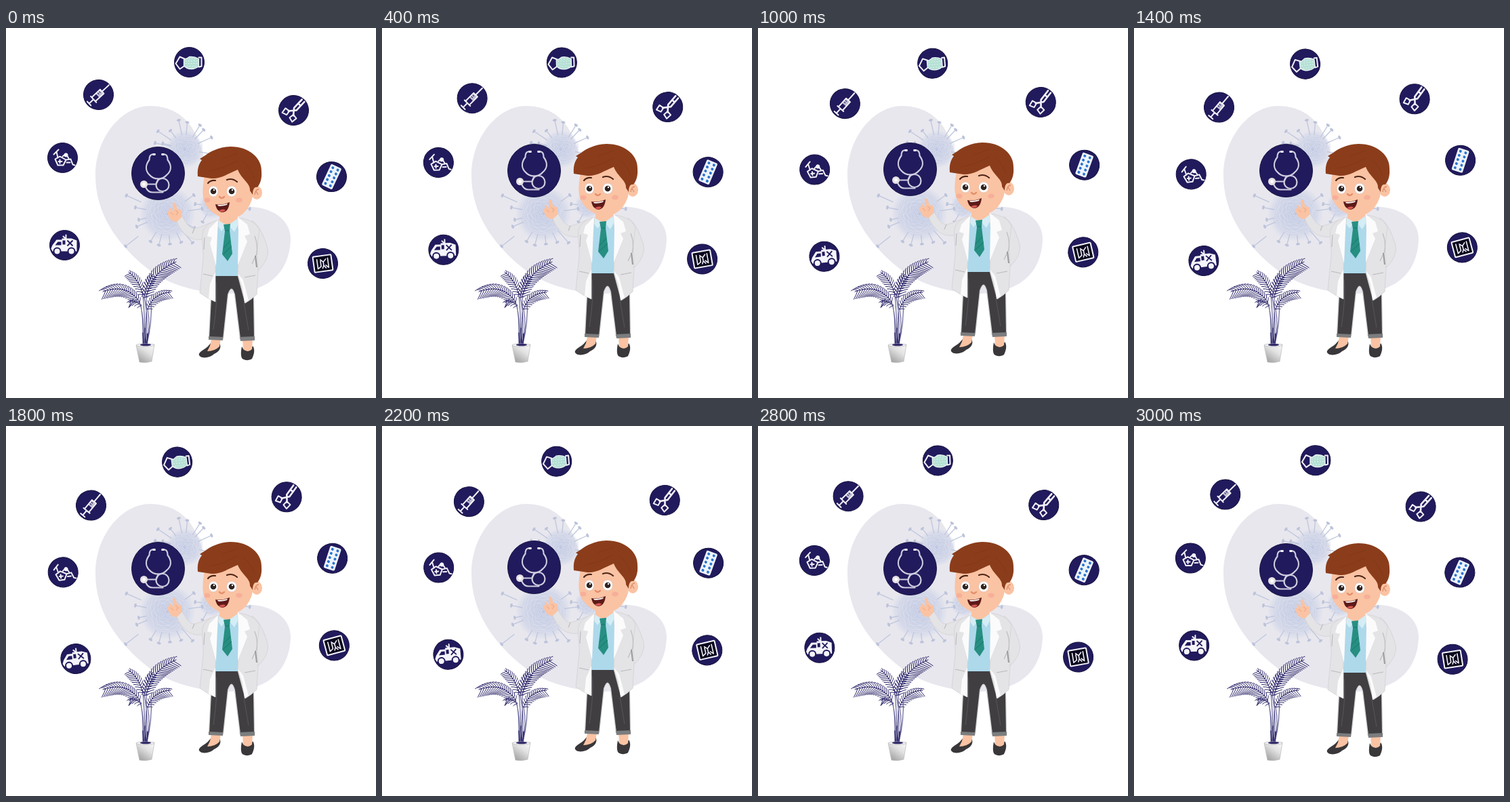
An HTML page that plays this animation: 546 by 546 pixels, repeating every 3.2 s.

```html
<!DOCTYPE html>
<html lang="en">
<head>
<meta charset="utf-8">
<title>Doctor with medical icons</title>
<style>
  html, body { margin: 0; width: 100%; height: 100%; overflow: hidden; background: #fff; }
  svg { display: block; width: 100%; height: 100%; }
  .line { fill: none; stroke: #f2f1f8; stroke-width: 2; stroke-linecap: round; stroke-linejoin: round; }
  .disc { fill: #211a5c; stroke: #151040; stroke-width: 1; }
  .white { fill: #f4f4fa; }
  .skin { fill: #fac3a3; }
  .coat { fill: #e4e3e5; stroke: #d2d1d4; stroke-width: .8; }
  .lapel { fill: #fbfbfc; }
</style>
</head>
<body>
<svg viewBox="0 0 546 546">
  <defs>
    <linearGradient id="potShade" x1="1" y1="0" x2=".3" y2="1">
      <stop offset="0" stop-color="#fafafa"/>
      <stop offset=".45" stop-color="#e2e2e2"/>
      <stop offset="1" stop-color="#a4a4a6"/>
    </linearGradient>
    <radialGradient id="haze">
      <stop offset="0" stop-color="#b2bdde" stop-opacity=".75"/>
      <stop offset=".75" stop-color="#bdc6e1" stop-opacity=".5"/>
      <stop offset="1" stop-color="#c9cfe5" stop-opacity="0"/>
    </radialGradient>
  </defs>

  <path fill="#e8e7ee" d="M212 115C240 115 261 127 273 145C286 164 292 185 296 210C302 245 326 263 364 264C398 267 420 286 420 311C419 355 393 392 322 392C272 389 234 376 205 352C160 315 132 270 132 218C132 160 172 115 212 115Z"/>
  <g id="viruses"></g>
  <g id="plant"></g>

  <g id="ring">
    <g transform="translate(270.5 50.5)">
      <circle class="disc" r="22"/>
      <path class="line" d="M-7-5L-14-8L-20 2L-14 10L-8 6M14-7L18-7L18 6L14 7"/>
      <path fill="#b5e0d5" stroke="#eef8f6" stroke-width="1.3" d="M-8-4Q-3-5 0-8Q7-9 14-5V6Q9 10 3 10Q-4 10-8 5Z"/>
      <path fill="none" stroke="#e3f5ef" stroke-dasharray="2 2" d="M-6-2H12M-6 2H12M-4 6H10M-1-5H9"/>
    </g>
    <g transform="translate(136.5 98.5) rotate(-43)">
      <circle class="disc" r="22"/>
      <path class="line" d="M-19-4V4M-19 0H-10M-10-6V6M-9-4H7V4H-9M7 0H12"/>
      <path class="line" d="M13 0H21" stroke-width="3"/>
      <path class="white" d="M-2-4H7V4H-2Z" opacity=".75"/>
      <path stroke="#211a5c" d="M1-3V0M4-3V0"/>
    </g>
    <g transform="translate(83.5 191.5)">
      <circle class="disc" r="22"/>
      <path class="line" d="M-6-12L-13-5M-9-9L-7 0M-11 2L-4-2L5 3L1 11L-7 11ZM0-2L5-6L9 1M5 3L12 2L15 10L18 11M6 7L11 7"/>
      <path class="line" d="M-4 3V8M-6 5.5H-1" stroke-width="1.6"/>
      <circle class="white" cx="5" cy="-4" r="3"/>
    </g>
    <g transform="translate(86.5 320.5)">
      <circle class="disc" r="22"/>
      <path class="white" d="M-18 0L-12-8L-4-8V-10H10L18-7V9H-18L-20 5Z"/>
      <path class="line" d="M-2-13L1-10M2-15V-10"/>
      <path fill="#211a5c" d="M-14 0L-10-5H-5V0ZM-3-7H1V-1H-3Z"/>
      <path stroke="#211a5c" stroke-width="1.8" d="M4 1L12-7M4-7L12 1"/>
      <g fill="#f4f4fa" stroke="#211a5c" stroke-width="2">
        <circle cx="-11" cy="9" r="5"/><circle cx="10" cy="9" r="5"/>
      </g>
    </g>
    <g transform="translate(424.5 121.5) rotate(43)">
      <circle class="disc" r="22"/>
      <path class="line" d="M-2-20L-2-3L5 6M3-20L3-3L-5 6M-2-12H3" style="stroke-width:2.6"/>
      <path class="line" d="M-11 6L-4 5L-3 12L-10 14ZM11 6L4 5L3 12L10 14Z"/>
    </g>
    <g transform="translate(480.5 219.5) rotate(25)">
      <circle class="disc" r="22"/>
      <rect x="-8.5" y="-17" width="17" height="34" rx="2" fill="#eef4fc"/>
      <g id="pills" fill="#2b74cf"></g>
    </g>
    <g transform="translate(467.5 347.5) rotate(-8)">
      <circle class="disc" r="22"/>
      <rect x="-13.5" y="-11.5" width="27" height="23" rx="1" fill="#07061c" stroke="#f4f4fa" stroke-width="2"/>
      <path class="line" d="M-8-7V7L-3 4V-4M-3-6L1-2L5-6M1-2V2M8-7V7L4 3M-1 7L1 3L4 7" style="stroke-width:1.6"/>
    </g>
  </g>

  <g id="doctor">
    <g transform="translate(224.5 214.5)">
      <circle class="disc" r="39"/>
      <g fill="none" stroke="#cfcde0" stroke-width="2.2" stroke-linecap="round">
        <path d="M-5-28H-9Q-13-27-13-20C-19-12-19-4-13 2Q-8 8 0 8Q8 8 13 2C20-4 20-12 14-20Q14-27 10-28H6"/>
        <path d="M0 8Q-1 13-3 16H-18"/>
        <circle cx="6.5" cy="17" r="9.5"/>
        <path d="M-18 21Q-15 28-8 28H7"/>
      </g>
      <path stroke="#f4f4fa" stroke-width="3" d="M-8-28H-4M5-28H9"/>
      <circle cx="-21" cy="16" r="5.5" fill="#e6e1e4"/>
      <circle cx="-21" cy="16" r="2.4" fill="#fff"/>
    </g>

    <path fill="#39373a" d="M302 465C303 471 308 473 315 465C319 472 314 478 307 481C302 486 292 488 287 485C282 482 286 478 291 475C296 472 299 469 302 465ZM348 470C351 478 361 478 364 469C368 474 366 482 363 488C359 491 351 491 348 487C346 482 347 475 348 470Z"/>
    <path class="skin" d="M303 459H317L315 470Q308 477 297 477L301 469ZM349 459H364L363 474Q357 480 350 474Z"/>
    <path fill="#403e41" stroke="#cfcfd1" stroke-width="2.4" paint-order="stroke" d="M308 364H345L365 398L366 458H346L338 393Q333 376 327 393L320 458H300L303 400Z"/>
    <path fill="#7c7d7f" d="M299 455L320 456V461L299 460ZM345 456L367 455V461L346 462Z"/>
    <path fill="none" stroke="#58565a" d="M310 375Q313 400 306 445M351 405L358 446"/>

    <path class="coat" d="M363 284C374 291 382 310 386 325C388 336 383 347 372 358L358 358L363 342L371 330Z"/>
    <path class="skin" d="M315 275H341V290L327 300L315 291Z"/>
    <path fill="#add9eb" d="M313 285L326 291L342 283L344 310L342 366H308L310 310Z"/>
    <path fill="#d4edf6" d="M314 284L325 291L318 300L311 290ZM342 281L328 291L337 301L344 288Z"/>
    <path fill="#278f82" d="M321 290L331 289L330 299L334 333L327 344L319 334L323 300Z"/>
    <path stroke="#1b7469" fill="none" d="M323 299H330M321 325L331 314M321 333L333 322"/>

    <path class="coat" d="M252 285L260 278C266 288 270 295 277 296C286 295 294 290 303 287L297 310C286 314 273 313 265 305C258 298 254 292 252 285Z"/>
    <path class="coat" d="M314 283C302 286 294 292 291 299C287 310 292 325 291 341L286 391Q297 399 309 404L309 360L311 312Z"/>
    <path class="coat" d="M342 280C356 281 369 287 374 298L370 330L372 357L370 393Q362 401 353 406L342 365L344 315Z"/>
    <path class="lapel" d="M313 283L300 296L297 307L304 309L301 318L310 351L312 302ZM342 279L356 290L360 304L352 307L356 315L342 350L343 300Z"/>
    <path class="lapel" d="M309 360L301 378L299 399L309 404ZM342 362L349 382L352 406L358 402L350 372Z"/>
    <path fill="none" stroke="#bab9bd" stroke-width="1.1" d="M291 363L305 366M352 368L368 365M367 307Q372 320 370 333L363 348M293 309L292 327M278 296L275 303"/>
    <path stroke="#99989c" stroke-width="2" d="M368 336L370 353"/>

    <path class="skin" d="M239 275C236 272 238 269 242 271L240 267C241 264 244 266 247 271L246 260C247 256 250 257 251 261L253 268C257 266 260 269 259 274L260 278L252 286C245 286 241 282 239 275Z"/>
    <path fill="none" stroke="#e9a182" d="M243 272L247 276M250 269L254 272L251 276"/>

    <ellipse class="skin" cx="370" cy="243" rx="8" ry="10"/>
    <path fill="none" stroke="#dc8d6c" stroke-width="1.3" d="M367 246Q368 238 373 238M369 241L372 246"/>
    <path class="skin" d="M293 216C292 226 289 238 291 250C293 264 305 276 325 282C346 282 357 270 363 253L367 226L346 200Z"/>
    <path fill="#8b3d1b" d="M283 219C282 209 284 201 289 195L286 193L294 188C302 182 313 176 331 175C360 175 378 193 377 212C378 222 375 230 371 235C366 234 364 239 364 246L360 240C361 229 348 224 342 209C327 215 317 223 303 222Z"/>
    <path fill="none" stroke="#75300f" stroke-width="1" opacity=".4" d="M300 211Q320 208 341 196M318 193L342 185M350 197Q362 208 367 222"/>
    <g fill="#f59d91" opacity=".5">
      <ellipse cx="297" cy="254" rx="4.5" ry="3.5"/><ellipse cx="344" cy="254" rx="5" ry="3.5"/>
    </g>
    <g fill="#fff" stroke="#ddbba9" stroke-width=".7">
      <ellipse cx="306" cy="241" rx="7" ry="8"/><ellipse cx="333" cy="241" rx="7.5" ry="8"/>
    </g>
    <g fill="#302421"><circle cx="306" cy="241" r="4.3"/><circle cx="333" cy="241" r="4.3"/></g>
    <g fill="#fff"><circle cx="307" cy="239" r="1.2"/><circle cx="334" cy="239" r="1.2"/></g>
    <path fill="none" stroke="#4d2418" stroke-width="2.2" stroke-linecap="round" d="M298 229Q302 224 309 225M326 224Q334 221 341 227"/>
    <path fill="none" stroke="#e48c68" stroke-width="2.4" stroke-linecap="round" d="M315 249Q318 253 322 249"/>
    <path fill="#5d1a18" d="M309 260Q319 262 330 257C329 267 325 272 319 272C313 271 310 266 309 260Z"/>
    <path fill="#fff" d="M312 261Q320 261.5 327 259L326 261Q319 263.5 313 262.5Z"/>
    <path fill="#d95650" d="M314 269.5Q320 266 324 268.5Q322 271.5 318 271.5Z"/>
  </g>
</svg>
<script>
  const byId = id => document.getElementById(id);
  const range = n => Array.from({ length: n }, (_, i) => i);
  const fix = n => n.toFixed(1);
  let seed = 7;
  const random = () => (seed = seed * 16807 % 2147483647) / 2147483647;

  // Hazy core with wavy rings, and spikes at [degrees, length]
  function virus(x, y, r, spikes) {
    const rings = range(Math.round(r / 3)).map(i => {
      const base = 3 + i * 3, phase = random() * 6;
      const points = range(40).map(k => {
        const a = k * Math.PI / 20;
        const d = base + Math.sin(a * 7 + phase) * 1.2 + random() * 1.3;
        return `${fix(x + d * Math.cos(a))} ${fix(y + d * Math.sin(a))}`;
      });
      return `M${points.join('L')}Z`;
    }).join('');
    const arms = spikes.map(([deg, len]) => {
      const a = deg * Math.PI / 180, c = Math.cos(a), s = Math.sin(a);
      const from = Math.max(r * .85, len - 24);
      const tx = x + c * len, ty = y + s * len;
      return `<path d="M${fix(x + c * from)} ${fix(y + s * from)}L${fix(tx)} ${fix(ty)}" stroke-width="1.3"/>
        <ellipse cx="${fix(tx)}" cy="${fix(ty)}" rx="1.8" ry="3" fill="#bcc3da" stroke="none"
          transform="rotate(${deg} ${fix(tx)} ${fix(ty)})"/>`;
    }).join('');
    return `<circle cx="${x}" cy="${y}" r="${r * 1.12}" fill="url(#haze)"/>
      <g fill="none" stroke="#bfc6dc"><path d="${rings}" stroke="#dfe3f0" stroke-width=".7"/>${arms}</g>`;
  }

  byId('viruses').innerHTML =
    virus(304, 262, 17, [[-70, 25], [-20, 50], [5, 56], [120, 28], [185, 25]]) +
    virus(264, 179, 25, [[-146, 48], [-168, 45], [-128, 35], [-102, 44], [-85, 40], [-58, 42],
      [-46, 40], [-24, 43], [10, 42], [150, 38], [195, 34]]) +
    virus(238, 274, 37, [[204, 66], [191, 48], [157, 49], [142, 78], [168, 43], [121, 48],
      [105, 48], [85, 45], [64, 47], [49, 57], [28, 45], [-8, 52], [-35, 48], [-125, 48]]);

  // Drooping leaflets sweep forward on both sides of a curved rib
  function frond(x0, y0, cx, cy, x1, y1, size, count) {
    let d = `M${x0} ${y0}Q${cx} ${cy} ${x1} ${y1}`;
    for (let i = 0; i < count; i++) {
      const t = i / count, u = 1 - t;
      const x = u * u * x0 + 2 * u * t * cx + t * t * x1;
      const y = u * u * y0 + 2 * u * t * cy + t * t * y1;
      const a = Math.atan2(u * (cy - y0) + t * (y1 - cy), u * (cx - x0) + t * (x1 - cx));
      const len = size * (.45 + .65 * Math.sin(Math.PI * (.15 + .75 * t)));
      for (const side of [-1, 1]) {
        const b = a + side * .95, e = a + side * .7;
        d += `M${fix(x)} ${fix(y)}Q${fix(x + len * .6 * Math.cos(b))} ${fix(y + len * .6 * Math.sin(b))} ` +
          `${fix(x + len * Math.cos(e))} ${fix(y + len * Math.sin(e) + 4)}`;
      }
    }
    return d;
  }

  const fronds = [
    [197, 404, 178, 376, 143, 389, 14, 17],
    [207, 397, 214, 360, 251, 345, 16, 18],
    [202, 394, 197, 372, 181, 360, 11, 11],
    [209, 415, 217, 391, 243, 390, 11, 13],
    [199, 410, 191, 399, 181, 405, 7, 6],
    [204, 398, 206, 378, 217, 363, 10, 9]
  ].map(f => frond(...f)).join('');

  byId('plant').innerHTML = `
    <g fill="none" stroke="#2a2468" stroke-linecap="round">
      <path d="${fronds}"/>
      <path stroke="#5c588f" stroke-width="1.1" d="M203 466Q204 425 197 404M204 466Q208 430 207 397M205 466Q205 423 202 394M207 466Q214 440 209 415M202 466Q203 430 199 410M206 466Q211 428 204 398M208 466Q216 432 214 404"/>
      <path stroke-width="1.6" d="M203 467L202 450M206 467L205 443M208 467L209 451"/>
    </g>
    <path fill="url(#potShade)" stroke="#b9b9bb" stroke-width=".7" d="M192 468L219 467L215 492Q206 495 197 493Z"/>
    <ellipse cx="205.5" cy="468" rx="13.5" ry="2.2" fill="#f4f4f4" stroke="#b0b0b4" stroke-width=".6"/>
    <ellipse cx="206" cy="467.5" rx="8" ry="1.7" fill="#332c69"/>`;

  byId('pills').innerHTML = range(10).map(i =>
    `<circle cx="${i % 2 ? 4 : -4}" cy="${(i >> 1) * 6.4 - 12.8}" r="2"/>`).join('');

  const STEP = 200, TURN = 8;
  const lift = [0, -2, -4, -6, -7, -6, -5, -4, -3];
  const ring = byId('ring'), doctor = byId('doctor');

  function draw() {
    const step = Math.floor(performance.now() / STEP) % (2 * TURN);
    const k = TURN - Math.abs(TURN - step);
    ring.setAttribute('transform', `rotate(${-k} 283 198)`);
    doctor.setAttribute('transform', `translate(0 ${lift[k]})`);
    requestAnimationFrame(draw);
  }
  draw();
</script>
</body>
</html>
```
